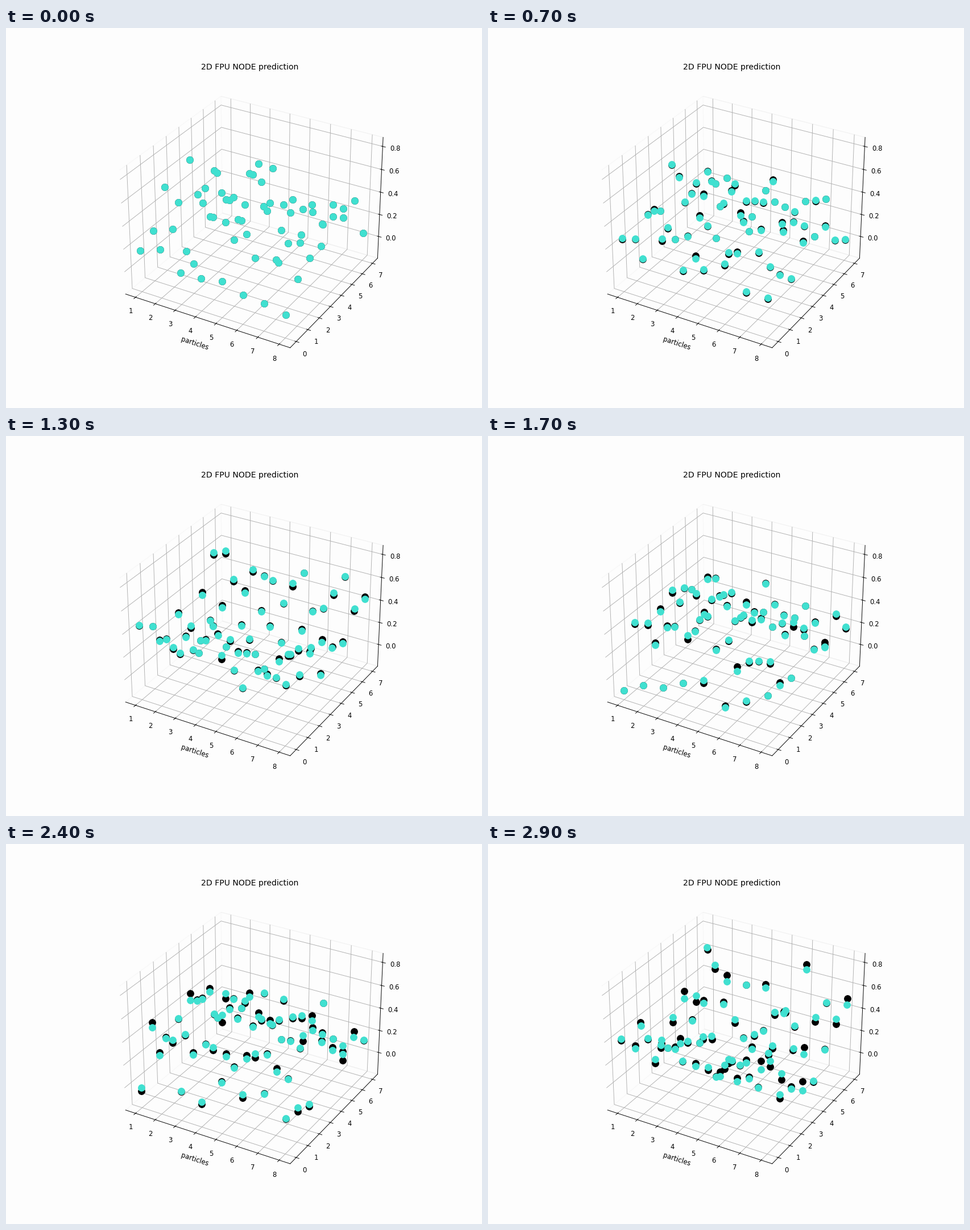
These frames come from a looping animation (837x669 px, 3000 ms). A matplotlib script:

```python
import matplotlib.pyplot as plt
import numpy as np
from matplotlib.animation import FuncAnimation

W, H, DPI = 837, 669, 83.7
FRAMES, INTERVAL = 30, 100
PAPER = "#fdfdfd"
N = 8

# Heights at rest in thousandths, one row per y and one column per x.
start = np.array([
    [168, 233, 83, 89, 121, 59, 43, 3],
    [251, 319, 67, 527, 385, 283, 323, 213],
    [547, 29, 636, 393, 342, 594, 370, 297],
    [324, 445, 682, 327, 856, 51, 282, 306],
    [617, 159, 358, 642, 435, 401, 521, 470],
    [143, 287, 85, 483, 102, 114, 263, 370],
    [354, 159, 415, 519, 289, 228, 345, 431],
    [0, 2, 37, 104, 113, 24, 221, 51]]) / 1000

# Normal modes of a periodic lattice of unit masses and unit springs.
modes = np.fft.fft2(start)
k = 2 * np.pi * np.arange(N) / N
omega = np.sqrt(4 - 2 * np.cos(k)[:, None] - 2 * np.cos(k))

# The predicted lattice has slightly mistuned modes, so it drifts away.
rng = np.random.default_rng(4)
mistuned = omega * (1 + 0.006 * rng.standard_normal((N, N)))


def heights(freq, t):
    """Lattice released from rest, after t time units."""
    return np.fft.ifft2(modes * np.cos(freq * t)).real.ravel()


# The small surplus keeps the pixel size from rounding down.
fig = plt.figure(figsize=((W + 1e-3) / DPI, (H + 1e-3) / DPI), dpi=DPI,
                 facecolor=PAPER)
ax = fig.add_subplot(projection="3d", facecolor=PAPER)
ax.set_title("2D FPU NODE prediction")
ax.set_xlabel("particles")
for axis in (ax.xaxis, ax.yaxis, ax.zaxis):
    axis.pane.set_fill(False)

y, x = np.divmod(np.arange(N * N), N)
x = x + 1


def dots(color):
    line, = ax.plot(x, y, start.ravel(), color=color, linestyle="none",
                    marker="o", markersize=10)
    return line


truth = dots("black")
guess = dots("turquoise")

ax.set(xlim=(0.49, 8.51), ylim=(-0.51, 7.51), zlim=(-0.2005, 0.8782))
ax.set_xticks(range(1, N + 1))
ax.set_yticks(range(N))
ax.set_zticks([0, 0.2, 0.4, 0.6, 0.8])


def update(frame):
    truth.set_data_3d(x, y, heights(omega, frame))
    guess.set_data_3d(x, y, heights(mistuned, frame))
    return truth, guess


anim = FuncAnimation(fig, update, frames=FRAMES, interval=INTERVAL,
                     repeat=True, repeat_delay=0, blit=False)
plt.show()
```
